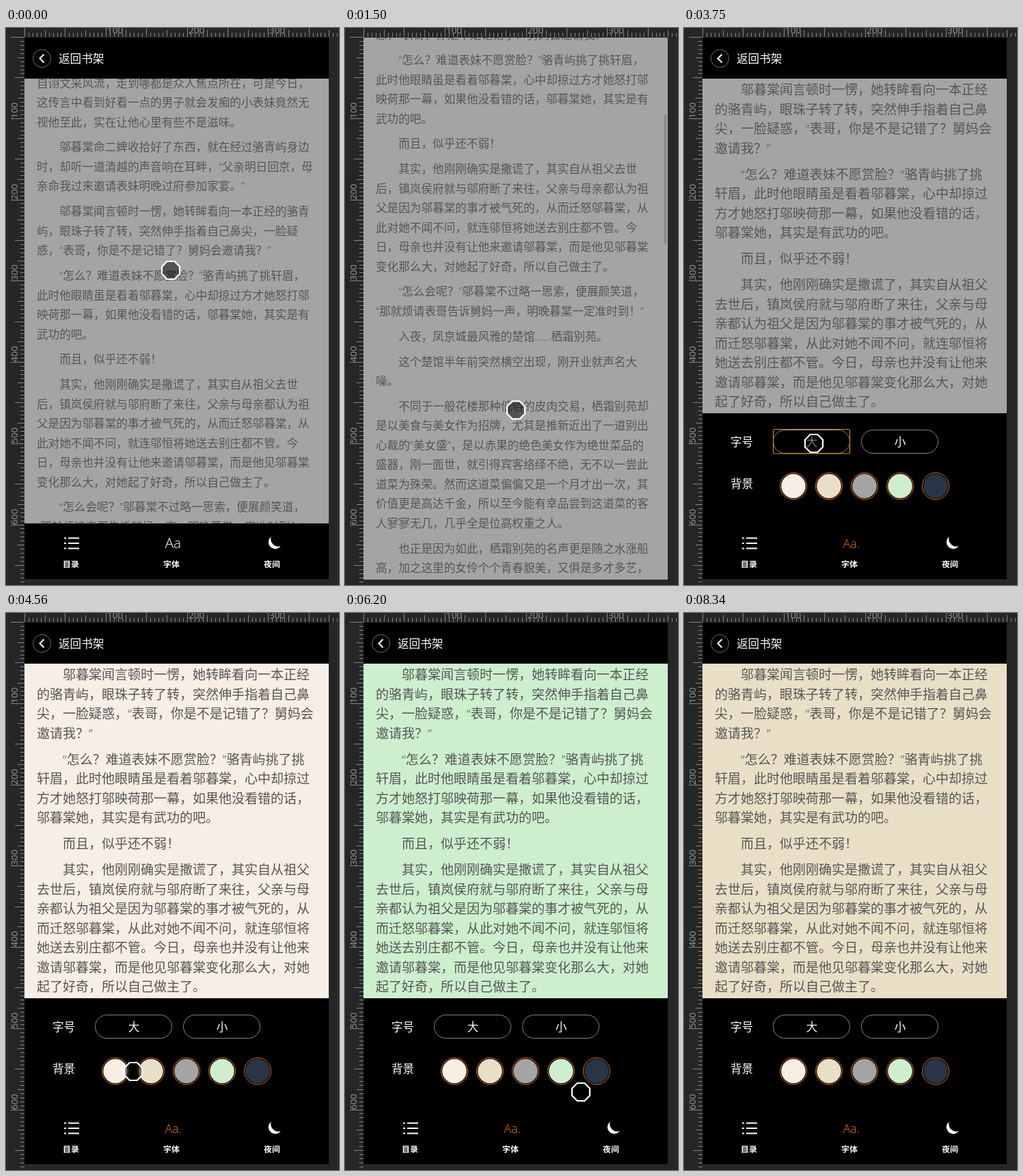
Recreate the animation shown at these times as an HTML page. Size 487 by 814 pixels, loop 8800 ms.

```html
<!DOCTYPE html>
<html lang="zh-CN">
<head>
<meta charset="utf-8">
<title>阅读器</title>
<style>
html, body { margin: 0; width: 100%; height: 100%; overflow: hidden; background: #262626; }
body { position: relative; font-family: 'Open Sans', 'Noto Sans CJK SC', 'Noto Sans CJK', sans-serif; text-spacing-trim: space-all; text-autospace: no-autospace; }
#page { position: absolute; left: 27px; top: 14px; width: 445px; height: 792px; overflow: hidden; border-bottom: 1px solid #3a3a3a; }
#story { position: absolute; left: 18px; top: 0; width: 408px; line-height: 28.5px; color: #555; font-weight: 300; }
#story p { margin: .5em 0; text-indent: 2em; }
#story p:first-child { text-indent: 0; }
svg { position: absolute; left: 0; top: 0; }
svg text { fill: #fff; font-size: 16.6px; }
.mid { text-anchor: middle; }
#labels text { font-size: 11.9px; font-weight: 700; }
#settings text { font-weight: 500; }
#rulers text { fill: #999; font-size: 13.5px; }
</style>
</head>
<body>
<div id="page"><div id="story">
<p>自诩文采风流，走到哪都是众人焦点所在，可是今日，这传言中看到好看一点的男子就会发痴的小表妹竟然无视他至此，实在让他心里有些不是滋味。</p>
<p>邬暮棠命二婢收拾好了东西，就在经过骆青屿身边时，却听一道清越的声音响在耳畔，“父亲明日回京，母亲命我过来邀请表妹明晚过府参加家宴。”</p>
<p id="anchor">邬暮棠闻言顿时一愣，她转眸看向一本正经的骆青屿，眼珠子转了转，突然伸手指着自己鼻尖，一脸疑惑，“表哥，你是不是记错了？舅妈会邀请我？”</p>
<p>“怎么？难道表妹不愿赏脸？”骆青屿挑了挑轩眉，此时他眼睛虽是看着邬暮棠，心中却掠过方才她怒打邬映荷那一幕，如果他没看错的话，邬暮棠她，其实是有武功的吧。</p>
<p>而且，似乎还不弱！</p>
<p>其实，他刚刚确实是撒谎了，其实自从祖父去世后，镇岚侯府就与邬府断了来往，父亲与母亲都认为祖父是因为邬暮棠的事才被气死的，从而迁怒邬暮棠，从此对她不闻不问，就连邬恒将她送去别庄都不管。今日，母亲也并没有让他来邀请邬暮棠，而是他见邬暮棠变化那么大，对她起了好奇，所以自己做主了。</p>
<p>“怎么会呢？”邬暮棠不过略一思索，便展颜笑道，“那就烦请表哥告诉舅妈一声，明晚暮棠一定准时到！”</p>
<p>入夜，凤京城最风雅的楚馆……栖霜别苑。</p>
<p>这个楚馆半年前突然横空出现，刚开业就声名大噪。</p>
<p>不同于一般花楼那种低俗的皮肉交易，栖霜别苑却是以美食与美女作为招牌，尤其是推新近出了一道别出心裁的“美女盛”，是以赤果的绝色美女作为绝世菜品的盛器，刚一面世，就引得宾客络绎不绝，无不以一尝此道菜为殊荣。然而这道菜偏偏又是一个月才出一次，其价值更是高达千金，所以至今能有幸品尝到这道菜的客人寥寥无几，几乎全是位高权重之人。</p>
<p>也正是因为如此，栖霜别苑的名声更是随之水涨船高，加之这里的女伶个个青春貌美，又俱是多才多艺，所以即使她们是卖艺不卖身，也仍然引得几乎整个凤京城的男人趋之若鹜，日夜爆满。</p>
<p>此时，栖霜别苑三楼一间装饰奢华的套间，在墙壁上镶嵌的拳头大的夜明珠辉光照耀下，满头珠翠，穿着艳丽的女子正看着面前厚厚的账本，聚精会神地噼里啪啦打着算盘。</p>
</div></div>

<svg width="487" height="814" fill="none">
  <g id="rulers"><path id="ticks" stroke="#858585"/></g>
  <rect id="thumb" x="467" width="3" height="189" rx="1.5" fill="#000" fill-opacity=".18"/>
  <g id="bars">
    <path d="M27 14h445v60H27zM27 724h445v82H27z" fill="#000"/>
    <circle cx="52.5" cy="44.5" r="13" stroke="#707070"/>
    <path d="M55.5 38.5l-6 6 6 6" stroke="#fff" stroke-width="2"/>
    <text x="77" y="51">返回书架</text>
    <path d="M85 745.5h3m3 0h16M85 753h3m3 0h16M85 760.5h3m3 0h16" stroke="#fff" stroke-width="2"/>
    <g id="labels" class="mid">
      <text x="95" y="787.5">目录</text>
      <text x="242" y="787.5">字体</text>
      <text x="389" y="787.5" id="modeLabel"></text>
    </g>
    <text id="fontIcon" x="232.5" y="760" font-weight="300"></text>
    <path id="moon" d="M388 743.5A9.7 9.7 0 1 0 401.5 757A10.5 10.5 0 0 1 388 743.5z" fill="#fff"/>
    <g id="sun" stroke="#c4c4c4" stroke-width="1.8">
      <circle cx="390" cy="753" r="5.5"/>
      <path id="rays"/>
    </g>
  </g>
  <g id="settings">
    <path d="M27 563h445v162H27z" fill="#000"/>
    <text x="68" y="611">字号</text>
    <text x="68" y="672">背景</text>
    <g stroke="#858585">
      <rect x="130.5" y="587.5" width="112" height="34" rx="17"/>
      <rect x="259.5" y="587.5" width="112" height="34" rx="17"/>
    </g>
    <g class="mid">
      <text x="187" y="611">大</text>
      <text x="316" y="611">小</text>
    </g>
    <rect id="focus" x="130.5" y="586.5" width="112" height="35.5" rx="1" stroke="#e59700"/>
    <g id="swatches"></g>
  </g>
  <polygon id="touch" points="-5.4,-13 5.4,-13 13,-5.4 13,5.4 5.4,13 -5.4,13 -13,5.4 -13,-5.4" fill="#000" fill-opacity=".5" stroke="#fff" stroke-width="2.2"/>
</svg>

<script>
const LOOP = 8800;
const SCALE = 1.1875;
const COLORS = ['#f7eee5', '#e9dfc7', '#a4a4a4', '#cdefce', '#283548'];
const $ = id => document.getElementById(id);

const BURSTS = [[150, 1090, 8], [1230, 1890, 6], [2170, 2800, 6], [3080, 4020, 8], [4140, 5130, 8],
  [5250, 6200, 8], [6350, 6780, 4], [7070, 7070, 1], [7500, 8340, 7]];
const steps = BURSTS.flatMap(([from, to, n]) =>
  Array.from({ length: n }, (_, i) => from + (to - from) * i / Math.max(n - 1, 1)));

// [time, y of the anchor paragraph's first line]
const SCROLL = [[0, 268.5], [150, 260], [420, 150], [690, -60], [960, -195], [1090, -205.5],
  [1230, -190], [1620, 22], [1760, 30.5]];
// [time, x, y]
const TOUCH = [[0, 241, 354], [290, 243, 480], [690, 244, 330], [1090, 246, 455], [1490, 250, 560],
  [1760, 253, 449], [1890, 253, 449], [2290, 260, 560], [2540, 253, 754], [2800, 253, 758],
  [3080, 245, 735], [3480, 190, 607], [4020, 190, 607], [4420, 160, 670], [4700, 211, 670],
  [4850, 264, 670], [4990, 316, 670], [5130, 368, 670], [5250, 382, 677], [5670, 320, 672],
  [5950, 320, 672], [6200, 345, 700], [6490, 392, 760], [6780, 403, 767], [7070, 401, 767],
  [7640, 395, 764], [8200, 400, 806], [8340, 400, 840]];
// [time, index into COLORS]
const BACKGROUND = [[0, 2], [4400, 0], [4690, 1], [4830, 2], [4980, 3], [5120, 4], [5640, 3], [6480, 4], [7630, 1]];

const latest = (keys, t) => keys.findLast(key => key[0] <= t);

function along(keys, t) {
  const i = keys.findLastIndex(key => key[0] <= t);
  const a = keys[i], b = keys[i + 1] || a;
  const part = a === b ? 0 : (t - a[0]) / (b[0] - a[0]);
  return a.slice(1).map((v, k) => v + (b[k + 1] - v) * part);
}

function show(id, visible) {
  $(id).style.display = visible ? '' : 'none';
}

function buildRulers() {
  let path = '', labels = '';
  for (let k = 0; k < 140; k++) {
    const d = k * 5 * SCALE;
    const length = k % 20 === 0 ? 20 : k % 10 === 0 ? 14 : k % 5 === 0 ? 10 : 6;
    const x = Math.round(27 + d) + .5, y = Math.round(14 + d) - .5;
    if (x < 487) path += `M${x} 13v${-Math.min(length, 13)}`;
    if (y < 814) path += `M27 ${y}h${-length}`;
    if (k && k % 20 === 0) {
      labels += `<text x="${x + 1.5}" y="7.5">${k * 5}</text>` +
        `<text transform="translate(17 ${y - .5}) rotate(-90)">${k * 5}</text>`;
    }
  }
  $('ticks').setAttribute('d', path);
  $('rulers').insertAdjacentHTML('beforeend', labels);
}

function buildIcons() {
  $('swatches').innerHTML = COLORS.map((color, i) => {
    const at = `cx="${160 + i * 52}" cy="669.5"`;
    return `<circle ${at} r="19.5" stroke="#e8720c"/><circle ${at} r="17.8" fill="${color}"/>`;
  }).join('');
  let rays = '';
  for (let a = 0; a < 8; a++) {
    const c = Math.cos(a * Math.PI / 4), s = Math.sin(a * Math.PI / 4);
    rays += `M${390 + 8 * c} ${753 + 8 * s}L${390 + 10.5 * c} ${753 + 10.5 * s}`;
  }
  $('rays').setAttribute('d', rays);
}

function draw(now) {
  const time = now % LOOP + 10;
  const t = steps.findLast(step => step <= time) || 0;
  const open = t >= 3080, night = t >= 6480 && t < 7630;
  const size = t < 3480 ? 14 : t < 3600 ? 15 : 16;

  $('page').style.background = COLORS[latest(BACKGROUND, t)[1]];
  $('story').style.fontSize = size * SCALE + 'px';
  const line = along(SCROLL, t)[0] + (size - 14) * 30.25;
  $('story').style.top = line - 28.25 - $('anchor').offsetTop + 'px';

  show('thumb', t >= 150 && t < 1740);
  $('thumb').setAttribute('y', 164 - (line + 205.5) * .237);
  show('bars', t < 400 || t >= 1740);
  show('settings', open);
  show('focus', t >= 3480 && t < 4400);
  show('moon', !night);
  show('sun', night);
  $('modeLabel').textContent = night ? '白天' : '夜间';

  const icon = $('fontIcon');
  icon.textContent = open ? 'Aa.' : 'Aa';
  icon.style.fill = open ? '#f0780a' : '#fff';
  icon.style.fontSize = open ? '18px' : '21px';

  const [x, y] = along(TOUCH, t);
  $('touch').setAttribute('transform', `translate(${x} ${y})`);
  show('touch', t < 8330);
}

buildRulers();
buildIcons();
const start = performance.now();
function frame() {
  draw(performance.now() - start);
  requestAnimationFrame(frame);
}
frame();
</script>
</body>
</html>
```
